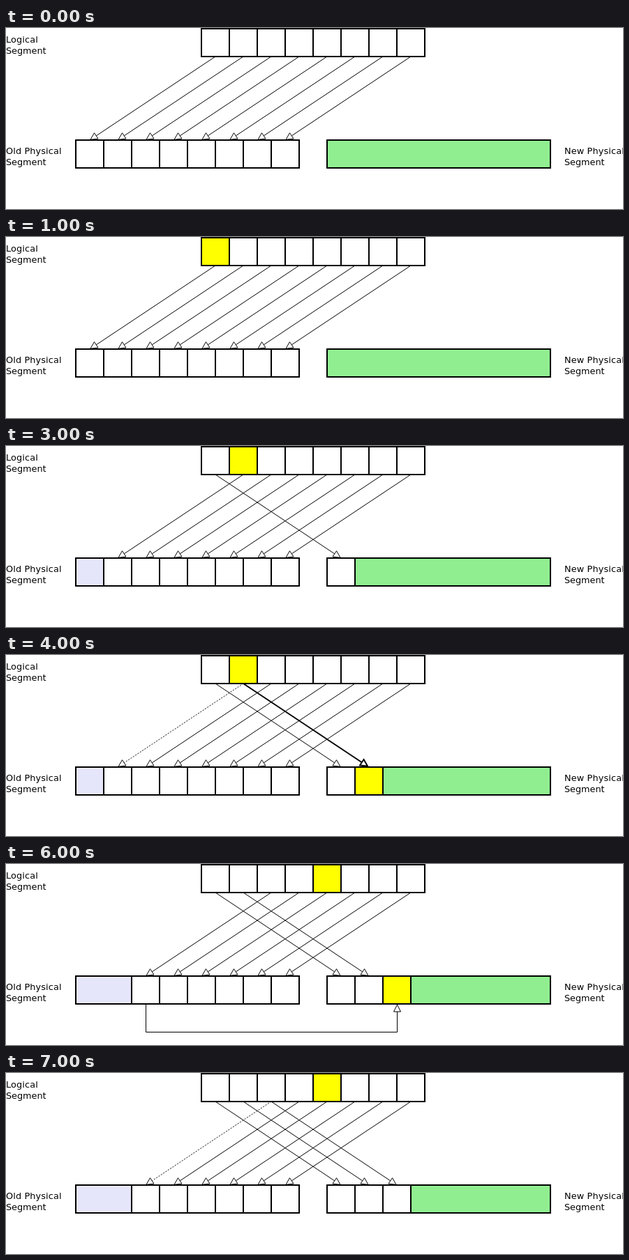
Animation, 884 px wide and 260 px high, one loop 8 s. Source, as an HTML page:

```html
<!DOCTYPE html>
<html lang="en">
<head>
<meta charset="utf-8">
<title>Segment relocation</title>
<style>
  html, body { margin: 0; width: 100%; height: 100%; overflow: hidden; background: #fff; }
  #stage { position: relative; width: 884px; height: 260px; overflow: hidden; }
  svg { position: absolute; left: 0; top: 0; }
  .label {
    position: absolute;
    font: 12.8px/16px "DejaVu Sans", sans-serif;
    white-space: pre;
    color: #000;
  }
  .label::first-line { letter-spacing: 0.15px; }
  .step { visibility: hidden; animation: show 8s step-end infinite; }
  .step rect { stroke: #000; stroke-width: 2; }
  .step path { stroke: #000; fill: none; }
  .step .head { fill: #fff; }
  .step .bold { stroke-width: 2; }
  .step .dotted { stroke-dasharray: 2 2; }
  @keyframes show {
    0% { visibility: visible; }
    12.5%, 100% { visibility: hidden; }
  }
</style>
</head>
<body>
<div id="stage">
  <svg id="diagram" width="884" height="260" viewBox="0 0 884 260"></svg>
  <div class="label" style="left:0;top:9px">Logical
Segment</div>
  <div class="label" style="left:0;top:169px">Old Physical
Segment</div>
  <div class="label" style="left:800px;top:169px">New Physical
Segment</div>
</div>
<script>
const CELL = 40, COUNT = 8;
const LOGICAL = { x: 280, y: 1 }, OLD = { x: 100, y: 161 }, NEW = { x: 460, y: 161 };
const WHITE = '#fff', HOT = '#ff0', FREE = '#90ee90', FREED = '#e6e6fa';
const HEAD = 10, MITER = Math.sqrt(5) / 2; // head size, stroke overhang at its tip

// hot: accessed block, moved: remapped blocks, freed: released old blocks,
// writing: newest block is being written, copy: background copy running
const steps = [
  { hot: -1, moved: 0, freed: 0 },
  { hot: 0, moved: 0, freed: 0 },
  { hot: 0, moved: 1, freed: 0, writing: true },
  { hot: 1, moved: 1, freed: 1 },
  { hot: 1, moved: 2, freed: 1, writing: true },
  { hot: 4, moved: 2, freed: 2 },
  { hot: 4, moved: 2, freed: 2, writing: true, copy: true },
  { hot: 4, moved: 3, freed: 2 }
];

const box = (row, i, n, fill) =>
  `<rect x="${row.x + i * CELL}" y="${row.y}" width="${n * CELL}" height="${CELL}" fill="${fill}"/>`;

const middle = (row, i) => row.x + (i + 0.5) * CELL;

// Polyline ending in a hollow triangle whose stroked tip touches the last point
function arrow(points, style = '') {
  const weight = style === 'bold' ? 2 : 1;
  const pts = [...points];
  const [ex, ey] = pts.pop();
  const [px, py] = pts[pts.length - 1];
  const len = Math.hypot(ex - px, ey - py);
  const ux = (ex - px) / len, uy = (ey - py) / len;
  const tx = ex - ux * MITER * weight, ty = ey - uy * MITER * weight;
  const bx = tx - ux * HEAD, by = ty - uy * HEAD;
  const wx = -uy * HEAD / 2, wy = ux * HEAD / 2;
  pts.push([bx, by]);
  return `<path class="${style}" d="M${pts.join('L')}"/>` +
    `<path class="head ${weight > 1 ? 'bold' : ''}" d="M${tx},${ty}` +
    `L${bx + wx},${by + wy}L${bx - wx},${by - wy}Z"/>`;
}

const link = (i, row, style) =>
  arrow([[middle(LOGICAL, i), LOGICAL.y + CELL], [middle(row, i), row.y]], style);

// Right-angled path below the cells, on half pixels to stay crisp
function copyLink(i) {
  const from = middle(OLD, i) + 0.5, to = middle(NEW, i) + 0.5;
  const top = OLD.y + CELL, low = top + CELL + 0.5;
  return arrow([[from, top], [from, low], [to, low], [to, top]]);
}

function draw({ hot, moved, freed, writing, copy }) {
  const used = moved + (copy ? 1 : 0);
  let out = '';

  for (let i = freed; i < COUNT; i++) out += link(i, OLD, i < moved ? 'dotted' : '');
  for (let i = 0; i < moved; i++) {
    out += link(i, NEW, writing && !copy && i === moved - 1 ? 'bold' : '');
  }
  if (copy) out += copyLink(moved);

  for (let i = 0; i < COUNT; i++) out += box(LOGICAL, i, 1, i === hot ? HOT : WHITE);
  if (freed) out += box(OLD, 0, freed, FREED);
  for (let i = freed; i < COUNT; i++) out += box(OLD, i, 1, WHITE);
  out += box(NEW, used, COUNT - used, FREE);
  for (let i = 0; i < used; i++) {
    out += box(NEW, i, 1, writing && i === used - 1 ? HOT : WHITE);
  }
  return out;
}

document.getElementById('diagram').innerHTML = steps.map((step, i) =>
  `<g class="step" style="animation-delay:${i - steps.length}s">${draw(step)}</g>`).join('');
</script>
</body>
</html>
```
